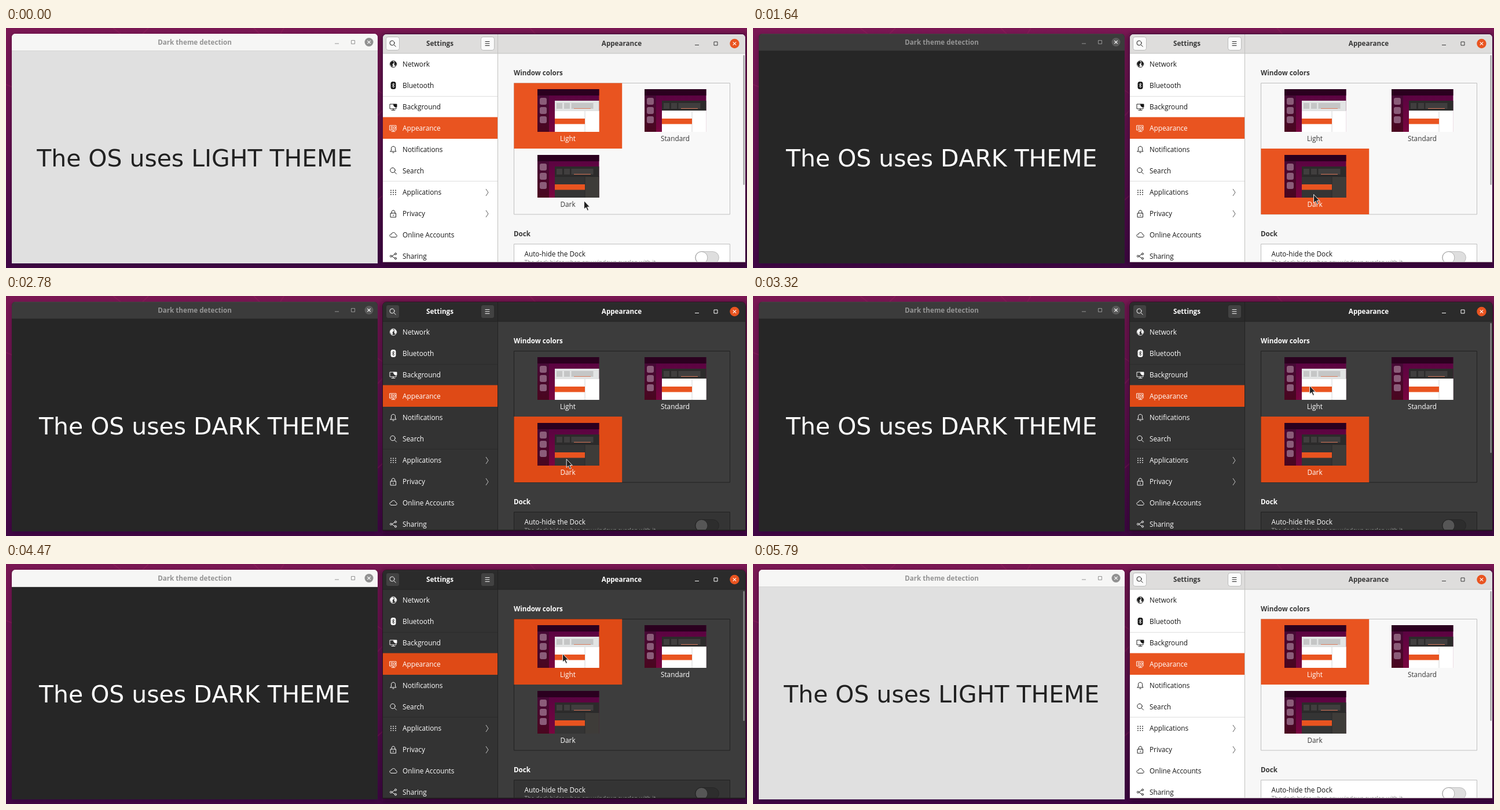
Recreate the animation shown at these times as an HTML page. Size 1280 by 416 pixels, loop 6.09 s.

```html
<!DOCTYPE html>
<html lang="en">
<head>
<meta charset="utf-8">
<title>Dark theme detection</title>
<style>
html, body { margin: 0; width: 100%; height: 100%; overflow: hidden; background: #4a0a45; }
svg { display: block; width: 100vw; height: 100vh; }
text { font: 11.8px "Open Sans", "Noto Sans", sans-serif; }
.b { font-weight: 700; font-size: 11.65px; }
.mid { text-anchor: middle; }
.big { font: 40.9px "DejaVu Sans", sans-serif; font-kerning: none; }
.sub { font-size: 9.9px; }
.ico { fill: none; stroke-width: .95; stroke-linejoin: round; stroke-linecap: round; }
</style>
</head>
<body>
<svg id="stage" viewBox="0 0 1280 416" xmlns="http://www.w3.org/2000/svg">
  <defs>
    <linearGradient id="wall" x2="0" y2="1">
      <stop stop-color="#7a1753"/><stop offset=".5" stop-color="#62104f"/><stop offset="1" stop-color="#410645"/>
    </linearGradient>
    <linearGradient id="dock" x2="0" y2="1">
      <stop stop-color="#470a36"/><stop offset="1" stop-color="#4a061f"/>
    </linearGradient>
    <linearGradient id="desk" x2="0" y2="1">
      <stop stop-color="#560342"/><stop offset="1" stop-color="#79053f"/>
    </linearGradient>
    <filter id="blur" x="-5%" y="-5%" width="110%" height="110%"><feGaussianBlur stdDeviation="4"/></filter>
    <clipPath id="leftClip"><path d="M10 408V17q0-7 7-7H635q7 0 7 7V408Z"/></clipPath>
    <clipPath id="rightClip"><path d="M651 406V18q0-7 7-7H1270q7 0 7 7V406Z"/></clipPath>
  </defs>
  <rect width="1280" height="416" fill="url(#wall)"/>
  <g fill="none" stroke="#a02660" stroke-width="2" opacity=".3">
    <path d="M0 98L10 102M185 0L198 10M236 10L246 0M428 0L438 10M474 10L480 0M642 108L651 114M642 152L651 142M642 298L651 290M905 0L915 11"/>
  </g>
  <g filter="url(#blur)" fill="#12001a">
    <rect x="10" y="13" width="632" height="397" opacity=".28"/>
    <rect x="649" y="11" width="630" height="400" opacity=".5"/>
  </g>
  <g id="left" clip-path="url(#leftClip)"></g>
  <path d="M650.5 406.5V18q0-7.5 7.5-7.5H1270q7.5 0 7.5 7.5V406.5Z" style="fill:none;stroke:var(--rim)"/>
  <g id="right" clip-path="url(#rightClip)"></g>
  <circle id="click" r="10" fill="#b3b200" opacity=".85"/>
  <path id="cursor" d="M0 0V14.5L3.3 11.5 5.8 17 8 16 5.6 10.7H10Z" fill="#202020" stroke="#fff" stroke-width=".9" stroke-linejoin="round"/>
</svg>
<script>
const $ = id => document.getElementById(id);
const rect = (x, y, w, h, fill, more = "") =>
  `<rect x="${x}" y="${y}" width="${w}" height="${h}" style="fill:${fill}" ${more}/>`;
const text = (x, y, s, fill, cls = "", id = "") =>
  `<text x="${x}" y="${y}" class="${cls}" id="${id}" style="fill:${fill}">${s}</text>`;
const line = (d, stroke, more = "") =>
  `<path d="${d}" style="fill:none;stroke:${stroke}" ${more}/>`;
const disc = (x, y, r, fill, more = "") =>
  `<circle cx="${x}" cy="${y}" r="${r}" style="fill:${fill}" ${more}/>`;

// Window buttons: minimise, maximise, close
function controls(xs, y, r, ink, disk, cross) {
  const [a, b, c] = xs;
  return line(`M${a - 3.5} ${y + 2.5}h7`, ink) +
    line(`M${b - 3} ${y - 3}h6v6h-6Z`, ink) +
    disc(c, y, r, disk) +
    line(`M${c - 2.7} ${y - 2.7}l5.4 5.4m0-5.4l-5.4 5.4`, cross, 'stroke-width="1.2"');
}

$("left").innerHTML =
  rect(10, 10, 632, 398, "var(--body)") +
  rect(10, 10, 632, 29, "var(--bar)") +
  rect(10, 10, 632, 1, "var(--barTop)") +
  rect(10, 39, 632, 1, "var(--barLine)") +
  text(326, 29, "Dark theme detection", "#949494", "b mid") +
  controls([571.5, 599.5, 627], 24.5, 7.5, "#949494", "var(--close)", "#fff") +
  text(325.7, 240, "", "var(--big)", "big mid", "msg");

// Sidebar icons, each drawn around its own centre
const icons = {
  Network: '<circle r="5.7"/><path d="M-4.5-3L-1-5 1-3 0-1-2 0-1 2-2 5-4 2-5 0ZM2-5L5-2 4 3 2 2 2 0Z" style="fill:var(--ink)" stroke-width=".4"/>',
  Bluetooth: '<rect x="-4" y="-6" width="8" height="12" rx="2.5" style="fill:var(--ink)"/><path d="M-2-2L2 2 0 4V-4L2-2-2 2" style="stroke:var(--side)"/>',
  Background: '<path d="M1-5H-6V3H5V1M-3 5.5H3M0 3V5"/><path d="M1-5H6V0H3L1-2Z" style="fill:var(--ink)"/>',
  Appearance: '<path d="M-6-5H5V3H-6ZM-3 5.5H3M0 3V5M-4-3H-1M-4-1H-1M-4 1H-1"/><circle cx="2" cy="-1" r="1.8"/>',
  Notifications: '<path d="M-5 3.5H5L3.5 1.5V-2C3.5-6.5-3.5-6.5-3.5-2V1.5ZM-1 5.5H1"/>',
  Search: '<circle cx="-1" cy="-1" r="4.2"/><path d="M2 2L5.5 5.5"/>',
  Applications: '<path d="M-4-3.6h0m4 0h0m4 0h0M-4 0h0m4 0h0m4 0h0M-4 3.6h0m4 0h0m4 0h0" stroke-width="1.8"/>',
  Privacy: '<path d="M-4.5-1H4.5V6H-4.5ZM-2.8-1V-3C-2.8-7 2.8-7 2.8-3V-1M0 2V3.5"/>',
  "Online Accounts": '<path d="M-3.5 4H4C7 4 7-.5 4-.7 3.5-5-2.5-5-3-1.3-7-1.5-7 4-3.5 4Z"/>',
  Sharing: '<path d="M3-3.5L-3 0 3 3.5"/><circle cx="4" cy="-4" r="1.6"/><circle cx="-4" cy="0" r="1.6"/><circle cx="4" cy="4" r="1.6"/>'
};
const rowY = [62.5, 99.5, 137, 174, 210.5, 247.5, 285, 322, 358.5, 395.5];

function sidebar() {
  let out = rect(651, 44, 198, 362, "var(--side)") +
    rect(651, 118, 198, 1, "var(--sep)") + rect(651, 265, 198, 1, "var(--sep)") +
    rect(651, 154.5, 198, 37.5, "var(--rowSel)");
  Object.keys(icons).forEach((name, i) => {
    const ink = i === 3 ? "#fff" : "var(--ink)", y = rowY[i];
    out += `<g class="ico" transform="translate(669 ${y})" style="stroke:${ink}">${icons[name]}</g>` +
      text(685, y + 4.2, name, ink);
    if (i === 6 || i === 7) out += line(`M829 ${y - 6}l4 6-4 6`, "var(--ink)", 'stroke-width=".9" opacity=".8"');
  });
  return out;
}

// Miniature desktop with a dark or light header and page
function thumb(x, y, darkHead, darkPage) {
  const head = darkHead ? "#2c2b2b" : "#e2e4e4", part = darkHead ? "#403e3e" : "#c5c6c6";
  let out = rect(0, 0, 106.5, 74, "url(#desk)") + rect(0, 11, 20, 63, "url(#dock)") +
    rect(0, 0, 106.5, 11, "#2b001f");
  for (const iy of [15, 31, 47]) out += rect(4, iy, 12, 12, "#8b5c79", 'rx="3"');
  out += rect(30, 20, 76.5, 17, head) +
    rect(30, 37, 76.5, 37, darkPage ? "#343434" : "#fff") +
    rect(30, 37, 76.5, .8, darkPage ? "#262626" : "#d8d8d8") +
    rect(33, 24, 10, 10, part) + rect(46, 24, 10, 10, part) + rect(58.5, 24, 38, 10, part) +
    rect(63, 33, 29, 1, "#d97a5c") +
    rect(82, 38, 24.5, 36, darkPage ? "#3e3c39" : "#fff") +
    rect(81.5, 38, 1, 36, darkPage ? "#2b2b2b" : "#d5d5d5") +
    rect(30, 51, 52, 9.5, "#e95420");
  return `<g transform="translate(${x} ${y})">${out}</g>`;
}

const button = x =>
  rect(x + .5, 15.5, 23, 23, "var(--btn)", 'rx="4" stroke="#000" stroke-opacity=".2"');

$("right").innerHTML =
  rect(651, 11, 626, 395, "var(--main)") +
  sidebar() +
  rect(651, 11, 626, 33, "var(--head)") +
  rect(651, 11, 626, 1, "var(--headTop)") +
  rect(651, 43.5, 626, 1, "var(--edge)") +
  rect(849, 11, 1, 395, "var(--edge)") +
  button(656) + button(820) +
  '<g class="ico" style="stroke:var(--ink)"><circle cx="667" cy="26" r="4"/><path d="M670 29l3.2 3.2M828 23.5h7m-7 3.5h7m-7 3.5h7"/></g>' +
  text(749.5, 31.2, "Settings", "var(--label)", "b mid") +
  text(1063.5, 31.2, "Appearance", "var(--label)", "b mid") +
  controls([1193.5, 1226, 1258.5], 27, 8.2, "var(--label)", "#e95420", "#fff") +
  text(877, 82.3, "Window colors", "var(--label)", "b") +
  rect(877.5, 95.5, 373, 227.5, "var(--card)") +
  line("M877.5 95.5H1250.5V323H877.5Z", "var(--frame)") +
  `<rect id="pick" x="877.5" width="186.7" style="fill:var(--sel)"/>` +
  thumb(918, 106, false, false) + thumb(1103, 106, true, false) + thumb(918, 220, true, true) +
  text(970.5, 196, "Light", "var(--light)", "mid") +
  text(1156, 196, "Standard", "var(--label)", "mid") +
  text(970.5, 309.8, "Dark", "var(--dark)", "mid") +
  text(877, 361.2, "Dock", "var(--label)", "b") +
  rect(877.5, 374.5, 373, 40, "var(--dockCard)") +
  line("M877.5 410V374.5H1250.5V410", "var(--frame)") +
  text(895.5, 395.8, "Auto-hide the Dock", "var(--ink)") +
  text(895.5, 409.8, "The dock hides when any windows overlap with it.", "var(--dim)", "sub") +
  rect(1190.5, 387.5, 41, 21, "var(--trough)", 'rx="10.5" stroke="#000" stroke-opacity=".2"') +
  disc(1201.5, 398, 10.3, "var(--knob)", 'stroke="#000" stroke-opacity=".25"') +
  rect(1273.5, 47, 2.3, 225, "var(--scroll)", 'id="bar" rx="1.1"') +
  rect(651, 405, 626, 1, "var(--edge)");

// name: [layer, light, dark]
const theme = {
  bar: ["title", "#f6f6f5", "#3b3b3b"], barTop: ["title", "#fbfbfb", "#434343"],
  barLine: ["title", "#d5d5d5", "#2b2b2b"], close: ["title", "#919191", "#5b5b5b"],
  body: ["body", "#e0e0e0", "#262626"], big: ["body", "#212121", "#ffffff"],
  main: ["win", "#f7f7f7", "#3c3c3c"], side: ["win", "#ffffff", "#333333"],
  head: ["win", "#dedddc", "#2b2b2b"], headTop: ["win", "#eeeeee", "#333333"],
  edge: ["win", "#c2c1c0", "#222222"], sep: ["win", "#dedede", "#2b2b2b"],
  card: ["win", "#f8f8f8", "#3d3d3d"], dockCard: ["win", "#ffffff", "#343434"],
  frame: ["win", "#bfbfbf", "#212121"], label: ["win", "#383838", "#ffffff"],
  sel: ["win", "#e95420", "#df4a16"], trough: ["win", "#dedede", "#2d2d2d"],
  scroll: ["win", "#a0a0a0", "#8c8c8c"], rim: ["win", "#45103f", "#24161f"],
  ink: ["ink", "#161616", "#ffffff"], dim: ["ink", "#8a8a8a", "#9a9a9a"],
  btn: ["ink", "#fafafa", "#424242"], knob: ["ink", "#ffffff", "#565656"],
  rowSel: ["ink", "#e95420", "#df4a16"]
};

const channels = c => [1, 3, 5].map(i => parseInt(c.slice(i, i + 2), 16));
function mix(a, b, k) {
  const p = channels(a), q = channels(b);
  return `rgb(${p.map((v, i) => Math.round(v + (q[i] - v) * k))})`;
}
const ease = p => p * p * (3 - 2 * p);
const within = (t, a, b) => t >= a && t < b;
// Progress in n equal held steps; the first is taken at once
const stepped = (t, from, to, n) =>
  Math.min(n, Math.floor((t - from) / (to - from) * (n - 1) + 1e-6) + 1) / n;

function pointer(t) {
  if (t < 70) return [998, 299];
  if (t < 700) return [968, 292];
  if (t < 790) return [968, 290];
  if (t < 2780) return [968, 288];
  if (t < 5090) {
    const p = ease(stepped(t, 2780, 3320, 8));
    return [968 - 7 * p, 288 - 133 * p];
  }
  const p = ease(stepped(t, 5090, 5630, 8));
  return [961 + 24 * p, 155 + 263 * p];
}

function layers(t) {
  let ink = 0;
  if (t >= 1730) ink = Math.min(3, Math.floor((t - 1730) / 90)) / 3;
  if (t >= 4710) ink = t < 4800 ? .5 : 0;
  return {
    title: +within(t, 1550, 4470),
    body: +within(t, 1640, 4560),
    win: +within(t, 1730, 4560),
    ink
  };
}

const root = $("stage");
function draw(t) {
  const k = layers(t), dark = within(t, 1380, 4250);
  for (const name in theme) {
    const [layer, a, b] = theme[name];
    root.style.setProperty("--" + name, mix(a, b, k[layer]));
  }
  root.style.setProperty("--light", dark ? "var(--label)" : "#fff");
  root.style.setProperty("--dark", dark ? "#fff" : "var(--label)");
  $("msg").textContent = `The OS uses ${k.body ? "DARK" : "LIGHT"} THEME`;
  $("pick").setAttribute("y", dark ? 209 : 95.5);
  $("pick").setAttribute("height", dark ? 114 : 113.5);
  // The scrollbar hides while the pointer rests
  $("bar").style.display = within(t, 2000, 2880) ? "none" : "";

  const [x, y] = pointer(t);
  $("cursor").setAttribute("transform", `translate(${x + .5} ${y + .5})`);
  const click = $("click");
  click.setAttribute("cx", x + .7);
  click.setAttribute("cy", y + 1.5);
  click.style.display = within(t, 1260, 1380) || within(t, 4090, 4250) ? "" : "none";
}

function tick() {
  draw(performance.now() % 6090);
  requestAnimationFrame(tick);
}
tick();
</script>
</body>
</html>
```
